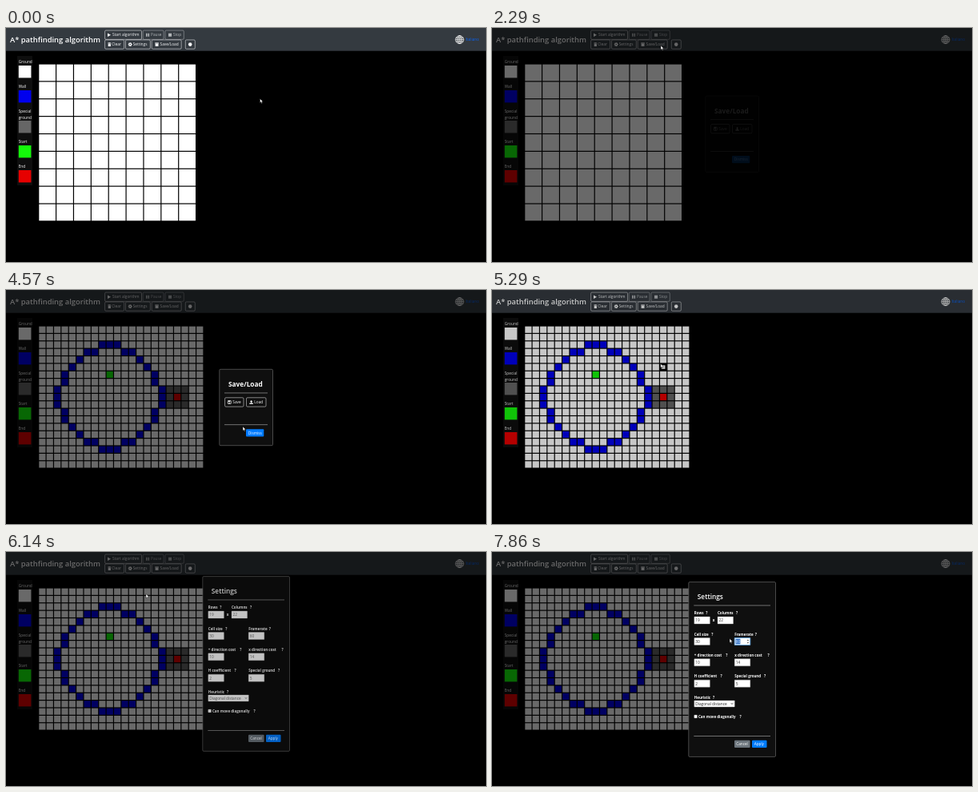
An HTML page with a canvas for the animation above (8000 ms loop, 600 by 293 pixels).

```html
<!DOCTYPE html>
<html lang="en">
<head>
<meta charset="utf-8">
<title>A* pathfinding algorithm</title>
<style>
html, body { margin: 0; width: 100%; height: 100%; overflow: hidden; background: #000; }
canvas { display: block; width: 600px; height: 293px; }
</style>
</head>
<body>
<canvas id="stage"></canvas>
<script>
const W = 600, H = 293, LOOP = 8000, FPS = 7;
const FONT = '"Open Sans", "Noto Sans", sans-serif';
const canvas = document.getElementById('stage');
const c = canvas.getContext('2d');
const dpr = window.devicePixelRatio || 1;
canvas.width = W * dpr;
canvas.height = H * dpr;

const COLORS = { ground: '#fff', wall: '#0000ee', special: '#666', start: '#14fa0a', end: '#e60000' };
const LIGHT = '#f8f9fa', DARK = '#212529', BLUE = '#007bff', LINK = '#0a62f0';
const SHADE = 0.59;

// Pointer path: time, x, y
const PATH = [
  [0, 317.5, 88.5], [100, 317.5, 88.5], [1140, 293, 74], [1860, 211, 22], [2330, 211, 22],
  [2780, 307, 140], [3150, 307, 140], [3860, 296, 171], [4571, 296, 171], [4840, 310, 177],
  [4930, 310, 177], [5286, 210.6, 92.2], [5680, 165, 20], [5920, 165, 20], [6143, 175, 52.5],
  [7430, 319, 110], [7560, 319, 110], [7857, 297, 108.5]
];
const TIMES = {
  save: { shade: 2100, open: 2270, close: 4892 },
  settings: { shade: 5860, open: 6030, close: Infinity },
  loaded: 4100, focus: 7540
};

let now = 0, mouse = { x: 0, y: 0 }, layer = 'page', shape = 'arrow';

const clamp = v => Math.max(0, Math.min(1, v));
const ramp = (start, ms) => clamp((now - start) / ms);
const easeOut = p => 1 - Math.pow(1 - p, 1.7);

function pointerAt(t) {
  for (let i = 1; i < PATH.length; i++) {
    const [t0, x0, y0] = PATH[i - 1], [t1, x1, y1] = PATH[i];
    if (t <= t1) {
      const p = (t - t0) / (t1 - t0);
      return { x: x0 + (x1 - x0) * p, y: y0 + (y1 - y0) * p };
    }
  }
  const [, x, y] = PATH[PATH.length - 1];
  return { x, y };
}

function text(s, x, y, size = 4.8, color = '#fff', weight = 400) {
  c.font = `${weight} ${size}px ${FONT}`;
  c.fillStyle = color;
  c.fillText(s, x, y);
}

function rect(x, y, w, h, color) {
  c.fillStyle = color;
  c.fillRect(x, y, w, h);
}

function rounded(x, y, w, h, r, fill, stroke, line = 0.5) {
  c.beginPath();
  c.roundRect(x, y, w, h, r);
  if (fill) { c.fillStyle = fill; c.fill(); }
  if (stroke) { c.strokeStyle = stroke; c.lineWidth = line; c.stroke(); }
}

function poly(points, fill) {
  c.beginPath();
  points.forEach(([x, y]) => c.lineTo(x, y));
  c.closePath();
  c.fillStyle = fill;
  c.fill();
}

function circle(x, y, r, color) {
  c.beginPath();
  c.arc(x, y, r, 0, 7);
  c.fillStyle = color;
  c.fill();
}

const inside = (x, y, w, h) =>
  mouse.x >= x && mouse.x <= x + w && mouse.y >= y && mouse.y <= y + h;

function hovered(owner, ...box) {
  const hot = layer === owner && inside(...box);
  if (hot) shape = 'hand';
  return hot;
}

// Icons, drawn from their left edge and vertical centre
const ICONS = {
  play(x, y, col) { poly([[x, y - 2.3], [x + 4, y], [x, y + 2.3]], col); },
  pause(x, y, col) { rect(x, y - 2, 1.6, 4, col); rect(x + 2.5, y - 2, 1.6, 4, col); },
  stop(x, y, col) { rect(x, y - 2, 4.1, 4, col); },
  trash(x, y, col) {
    rect(x, y - 2.1, 4, 0.8, col);
    rect(x + 1.2, y - 2.6, 1.6, 0.6, col);
    rect(x + 0.4, y - 1, 3.2, 3.4, col);
  },
  gear(x, y, col) {
    c.strokeStyle = col;
    c.lineWidth = 1.3;
    c.beginPath();
    c.arc(x + 2.2, y, 1.4, 0, 7);
    c.stroke();
    for (let i = 0; i < 8; i++) {
      const a = i * Math.PI / 4;
      rect(x + 1.8 + 2.1 * Math.cos(a), y - 0.4 + 2.1 * Math.sin(a), 0.8, 0.8, col);
    }
  },
  box(x, y, col) { rect(x, y - 2.2, 4.5, 1.3, col); rect(x + 0.3, y - 0.6, 3.9, 2.8, col); },
  disk(x, y, col) {
    rounded(x + 0.3, y - 2, 4, 4, 0.5, null, col, 0.7);
    rect(x + 1, y - 1.6, 2.2, 1.1, col);
    circle(x + 2.3, y + 0.8, 0.7, col);
  },
  upload(x, y, col) {
    poly([[x + 2.3, y - 2.4], [x + 4, y - 0.5], [x + 0.6, y - 0.5]], col);
    rect(x + 1.7, y - 0.6, 1.2, 1.8, col);
    rect(x, y + 1, 4.6, 1.3, col);
  },
  dot(x, y, col) { circle(x + 2.2, y, 2.3, col); }
};

function outlineButton(owner, icon, label, x, y, w, iconX, textX, disabled) {
  const h = 11.3, hot = !disabled && hovered(owner, x, y, w, h);
  const ink = hot ? DARK : LIGHT, alpha = c.globalAlpha;
  if (disabled) c.globalAlpha *= 0.65;
  rounded(x, y, w, h, 1.3, hot ? LIGHT : null, LIGHT);
  ICONS[icon](iconX, y + 5.7, ink);
  text(label, textX, y + 7.4, 4.8, ink);
  c.globalAlpha = alpha;
}

function solidButton(owner, label, x, y, w, textX, color, hotColor) {
  rounded(x, y, w, 9.3, 1, hovered(owner, x, y, w, 9.3) ? hotColor : color);
  text(label, textX, y + 6.3, 4.7);
}

function globe(x, y, r) {
  c.strokeStyle = '#fff';
  c.lineWidth = 0.8;
  c.beginPath();
  c.arc(x, y, r, 0, 7);
  c.moveTo(x + r * 0.45, y);
  c.ellipse(x, y, r * 0.45, r, 0, 0, 7);
  c.moveTo(x, y - r);
  c.lineTo(x, y + r);
  for (const [dy, k] of [[-2.3, 0.9], [0, 1], [2.3, 0.9]]) {
    c.moveTo(x - r * k, y + dy);
    c.lineTo(x + r * k, y + dy);
  }
  c.stroke();
}

function header() {
  rect(0, 0, W, 28.7, '#343a40');
  text('A* pathfinding algorithm', 5, 17.8, 9.4, '#fff', 600);
  outlineButton('page', 'play', 'Start algorithm', 123.6, 3, 45.9, 127, 133);
  outlineButton('page', 'pause', 'Pause', 171.2, 3, 25.8, 175, 181, true);
  outlineButton('page', 'stop', 'Stop', 199, 3, 23.3, 203, 209, true);
  outlineButton('page', 'trash', 'Clear', 123.6, 14.9, 24, 127.3, 132.3);
  outlineButton('page', 'gear', 'Settings', 149.5, 14.9, 30.8, 153, 158.7);
  outlineButton('page', 'box', 'Save/Load', 182.2, 14.9, 37, 186.3, 192.5);
  outlineButton('page', 'dot', '', 224.3, 14.9, 12, 228, 0);
  globe(567, 14.6, 5);
  text('Italiano', 574.5, 16.2, 4.8, LINK);
}

function palette() {
  rect(14, 35, 19, 162, '#0e0e0e');
  const items = [
    ['Ground', 'ground', 47], ['Wall', 'wall', 78], ['Special', 'special', 116],
    ['Start', 'start', 147], ['End', 'end', 178]
  ];
  for (const [label, kind, y] of items) {
    const two = kind === 'special';
    text(label, 15.7, y - (two ? 10 : 2.6));
    if (two) text('ground', 15.7, y - 2.2);
    rect(15.8, y, 15.6, 15.4, COLORS[kind]);
  }
}

// Ring of walls around column 9, row 9; a special patch surrounds the end
function cellKind(col, row) {
  const dx = Math.abs(col - 9), dy = Math.abs(row - 9);
  const ring = [[7], [7], [6], [6], [5], [4], [2, 3], [0, 1]][dy] || [];
  if (ring.includes(dx)) return 'wall';
  if (col === 9 && row === 6) return 'start';
  if (col === 18 && row === 9) return 'end';
  return Math.abs(col - 18) <= 1 && dy <= 1 ? 'special' : 'ground';
}

function grid() {
  const loaded = now >= TIMES.loaded;
  const cols = loaded ? 22 : 9, rows = loaded ? 19 : 9, size = loaded ? 9.375 : 21.875;
  for (let row = 0; row < rows; row++) {
    for (let col = 0; col < cols; col++) {
      const x = 40.7 + col * size, y = 45 + row * size;
      const hot = layer === 'page' && inside(x, y, size, size);
      const gap = hot ? 2.4 : 0.6;
      rect(x + gap, y + gap, size - 2 * gap, size - 2 * gap,
        COLORS[loaded ? cellKind(col, row) : 'ground']);
    }
  }
}

function rule(x, y, w) { rect(x, y, w, 0.7, '#999'); }

function panel(x, y, w, h) { rounded(x, y, w, h, 1.3, '#0f0f0f', '#666', 0.7); }

function saveDialog() {
  panel(266.8, 99.3, 66.7, 95.4);
  text('Save/Load', 278, 120.8, 8.3, '#fff', 700);
  rule(273, 128.6, 54);
  outlineButton('save', 'disk', 'Save', 273.6, 134.8, 23.4, 277, 283.3);
  outlineButton('save', 'upload', 'Load', 300.5, 134.8, 24.5, 304.3, 310.3);
  rule(273, 168.4, 54);
  solidButton('save', 'Dismiss', 300, 174.2, 22.3, 302.8, BLUE, '#0069d9');
}

function field(label, x, y, helpX, value) {
  text(label, x, y, 4.5, '#fff', 700);
  text('?', helpX, y, 4.6, '#fff', 700);
  if (value === undefined) return;
  const top = y + 3, active = label === 'Framerate' && now >= TIMES.focus;
  rounded(x, top, 19.6, 9, 0.3, '#fff', active ? '#5b9dd9' : '#999', active ? 0.9 : 0.4);
  if (layer === 'settings' && inside(x, top, 19.6, 9)) shape = 'beam';
  let ink = '#333';
  if (active) {
    const left = Math.max(mouse.x, x + 1.3), right = x + 7.2;
    if (left < right) {
      rect(left, top + 1.2, right - left, 6.6, '#2a6fc9');
      ink = '#fff';
    }
    poly([[x + 15.5, top + 3.7], [x + 16.7, top + 2], [x + 17.9, top + 3.7]], '#555');
    poly([[x + 15.5, top + 5.4], [x + 16.7, top + 7.1], [x + 17.9, top + 5.4]], '#555');
  }
  text(value, x + 1.5, top + 6.3, 4.8, ink);
}

function settingsDialog() {
  panel(245.8, 37.6, 108.7, 218.8);
  text('Settings', 256.8, 59, 8.3, '#fff', 600);
  rule(252.3, 66.6, 95.7);
  field('Rows', 252.8, 78, 267.3, '19');
  text('x', 275.8, 87.3, 4.6, '#fff', 700);
  field('Columns', 282, 78, 305, '22');
  field('Cell size', 252.8, 104.5, 274.3, '30');
  field('Framerate', 303.2, 104.5, 328.8, '60');
  field('+ direction cost', 252.8, 130.8, 292.3, '10');
  field('x direction cost', 303.2, 130.8, 344.4, '14');
  field('H coefficient', 252.8, 157.2, 285.5, '2');
  field('Special ground', 303.2, 157.2, 340, '5');
  field('Heuristic', 252.8, 183.5, 276);
  rounded(252.8, 186, 50.5, 8, 0.4, '#fff', '#999', 0.4);
  text('Diagonal distance', 254.3, 191.8, 4.75, '#222');
  c.beginPath();
  [[298.8, 189.2], [300, 190.6], [301.2, 189.2]].forEach(([x, y]) => c.lineTo(x, y));
  c.strokeStyle = '#222';
  c.lineWidth = 0.7;
  c.stroke();
  rounded(252.7, 204.1, 3.8, 3.8, 0.6, '#fff', '#888', 0.4);
  field('Can move diagonally', 258, 208, 309.5);
  rule(252.3, 230.2, 95.7);
  solidButton('settings', 'Cancel', 303, 235.8, 19.6, 305.3, '#6c757d', '#5a6268');
  solidButton('settings', 'Apply', 325, 235.8, 18.5, 327.7, BLUE, '#0069d9');
}

// Shade first, then the dialog fades in while it slides down
function modal(key, draw) {
  const { shade, open, close } = TIMES[key];
  const dim = Math.min(ramp(shade, 150), 1 - ramp(close + 300, 150));
  rect(0, 0, W, H, `rgba(0,0,0,${SHADE * dim})`);
  const alpha = Math.min(ramp(open, 150), 1 - ramp(close, 150));
  if (alpha <= 0) return;
  const slide = Math.min(easeOut(ramp(open, 300)), 1 - easeOut(ramp(close, 300)));
  c.save();
  c.globalAlpha = alpha;
  c.translate(0, -15.6 * (1 - slide));
  draw();
  c.restore();
}

function pointer() {
  const outlines = {
    arrow: [[0, 0], [0, 5.2], [1.2, 4.1], [2, 5.9], [2.9, 5.5], [2.1, 3.8], [3.7, 3.7]],
    hand: [[-0.6, 0], [0.5, 0], [0.6, 2], [3.4, 2.7], [3.5, 4.6], [2.8, 6.5],
      [-0.3, 6.5], [-2.2, 3.8], [-1.6, 3.2], [-0.6, 4.1]]
  };
  c.save();
  c.translate(mouse.x, mouse.y);
  if (shape === 'beam') {
    rect(-0.3, -2.5, 0.6, 5, '#000');
    rect(-1.2, -2.8, 2.4, 0.5, '#000');
    rect(-1.2, 2.3, 2.4, 0.5, '#000');
  } else {
    poly(outlines[shape], '#fff');
    c.strokeStyle = '#000';
    c.lineWidth = 0.4;
    c.stroke();
  }
  c.restore();
}

function activeLayer() {
  const { save, settings } = TIMES;
  if (now >= settings.shade) return 'settings';
  return now >= save.shade && now < save.close + 300 ? 'save' : 'page';
}

function draw(ms) {
  const step = Math.min(Math.floor((ms % LOOP) * FPS / 1000 + 0.035), LOOP * FPS / 1000 - 1);
  now = step * 1000 / FPS;
  mouse = pointerAt(now);
  layer = activeLayer();
  shape = 'arrow';
  c.setTransform(dpr, 0, 0, dpr, 0, 0);
  rect(0, 0, W, H, '#000');
  header();
  palette();
  grid();
  modal('save', saveDialog);
  modal('settings', settingsDialog);
  pointer();
}

const began = performance.now();
function tick() {
  draw(performance.now() - began);
  requestAnimationFrame(tick);
}
tick();
</script>
</body>
</html>
```
